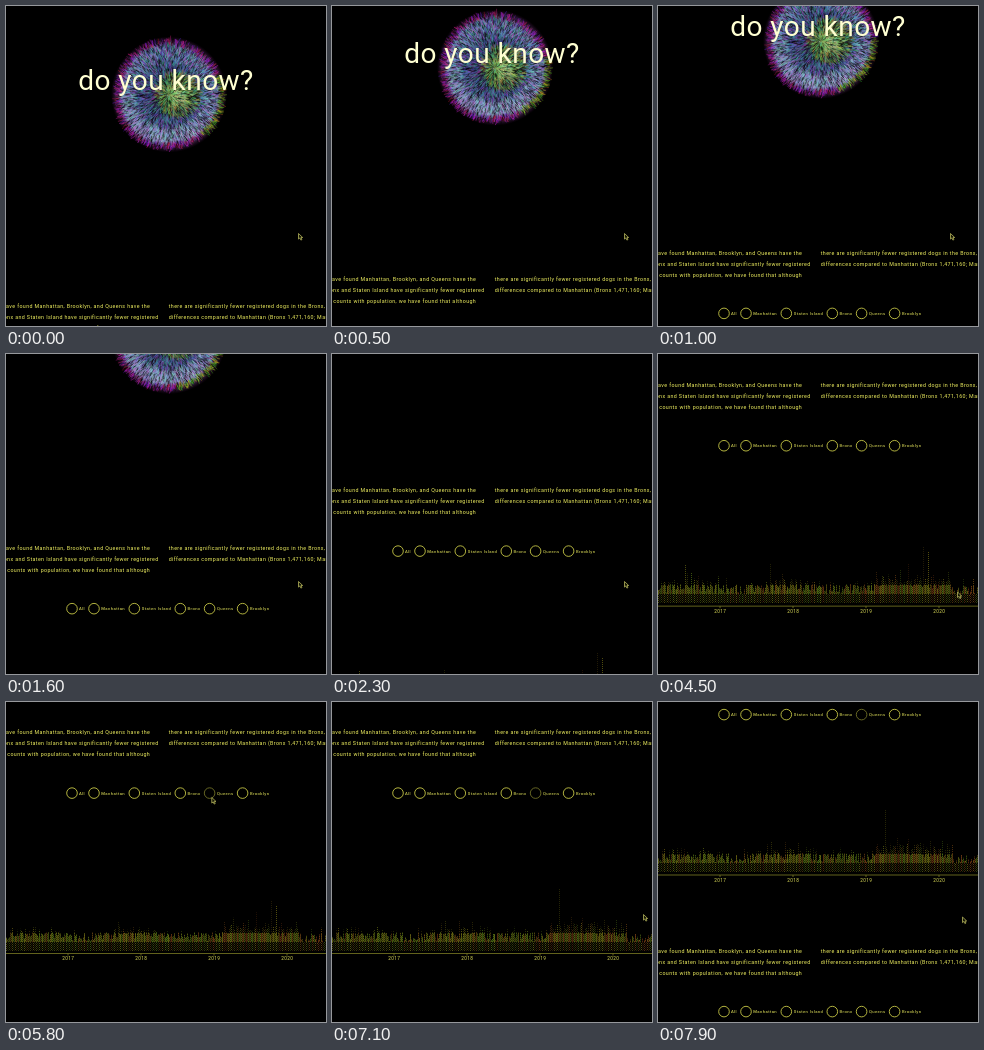
Write an HTML page with a canvas that moves like this. It is 320 px wide and 320 px high and loops after 8000 ms.

```html
<!DOCTYPE html>
<html lang="en">
<head>
<meta charset="utf-8">
<style>
  html, body { margin: 0; width: 100%; height: 100%; overflow: hidden; background: #000; }
  canvas, svg { position: absolute; left: 0; top: 0; width: 100%; height: 100%; }
  text { font-family: Roboto, Arial, sans-serif; fill: #f0f060; }
  .title { font-size: 28px; letter-spacing: .47px; fill: #ffffd2; }
  .body { font-size: 5.3px; letter-spacing: .395px; }
  .label { font-size: 4.2px; letter-spacing: .4px; }
  .year { font-size: 4.7px; letter-spacing: .35px; fill: #dcdc58; text-anchor: middle; }
  .end { text-anchor: end; }
  circle { fill: none; stroke: #d0d04a; stroke-width: .85; }
  .axis { fill: none; stroke: #7c7c24; stroke-width: .8; }
  #cursor { fill: #181806; stroke: #b4b45c; stroke-width: .8; }
</style>
</head>
<body>
<canvas id="stage" width="320" height="320"></canvas>
<svg viewBox="0 0 320 320">
  <g id="page"></g>
  <path id="cursor" d="M0 0V5.6L1.4 4.4L2.4 6.6L3.4 6.1L2.5 4H4.2Z"/>
</svg>
<script>
const LOOP = 8000, STEP = 100, BASE = 521.5, SECTION = 297;
const byId = id => document.getElementById(id);
const page = byId('page'), cursor = byId('cursor');
const ctx = byId('stage').getContext('2d');

let seed = 7;
const rand = () => (seed = seed * 16807 % 2147483647) / 2147483647;
const clamp = v => Math.max(0, Math.min(1, v));
const ease = v => v * v * (3 - 2 * v);

function add(tag, attrs, text = '') {
  const node = document.createElementNS('http://www.w3.org/2000/svg', tag);
  for (const key in attrs) node.setAttribute(key, attrs[key]);
  node.textContent = text;
  page.append(node);
  return node;
}
const write = (text, x, y, style) => add('text', { x, y, class: style }, text);

// Page content
write('do you know?', 72.2, 83.7, 'title');

const leftColumn = [
  ['have found Manhattan, Brooklyn, and Queens have the', 144.2],
  ['Bronx and Staten Island have significantly fewer registered', 152.6],
  ['counts with population, we have found that although', 144.2]
];
const rightColumn = [
  'there are significantly fewer registered dogs in the Bronx,',
  'differences compared to Manhattan (Bronx 1,471,160; Manhattan'
];
const boroughs = [
  ['All', 66, 73], ['Manhattan', 88, 95.3], ['Staten Island', 128.3, 135.8],
  ['Bronx', 174.3, 181.6], ['Queens', 203.6, 211], ['Brooklyn', 236.6, 244]
];

function addSection(dy) {
  leftColumn.forEach(([line, x], i) => write(line, x, 302.3 + dy + i * 11, 'body end'));
  rightColumn.forEach((line, i) => write(line, 162.7, 302.3 + dy + i * 11, 'body'));
  return boroughs.map(([name, cx, x]) => {
    write(name, x, 362.7 + dy, 'label');
    return add('circle', { cx, cy: 361.1 + dy, r: 5.3 });
  });
}
const queens = addSection(0)[4];
addSection(SECTION);

add('path', { class: 'axis', d: `M0 ${BASE}H320` + [62, 135, 208, 281].map(x => `M${x} ${BASE}v2`).join('') });
[2017, 2018, 2019, 2020].forEach((year, i) => write(year, 62.2 + i * 73, BASE + 6.9, 'year'));

// Hairy ball
const BALL = 163, RADIUS = 58;
const hairs = Array.from({ length: 6500 }, () => ({
  a: rand() * Math.PI * 2, q: Math.sqrt(rand()), tilt: (rand() - .5) * .8,
  len: 2 + rand() * 4, tone: rand(), mix: rand() - .5
}));

function glow(x, y, r, ...colors) {
  const fill = ctx.createRadialGradient(x, y, 0, x, y, r);
  colors.forEach((color, i) => fill.addColorStop(i / (colors.length - 1), color));
  ctx.fillStyle = fill;
  ctx.fillRect(x - r, y - r, 2 * r, 2 * r);
}

function hairColor({ a, q, tone, mix }, x, y, turn) {
  if (tone < .36) return '#000';
  const core = Math.hypot(x - 9, y);
  const right = Math.cos(a - .25 - turn);
  let hue = 225, sat = 50, light = 42, spread = 170;
  if (core < 21) [hue, light] = [95, 66 - core];
  else if (q > .9) [hue, sat, light, spread] = [right > .8 ? 80 : 305, 75, 42, 110];
  else if (q > .62) light = 58 + 9 * Math.sin(a);
  return `hsl(${hue + mix * spread} ${sat}% ${light + (tone - .68) * 34}%)`;
}

function drawBall(y, turn) {
  glow(BALL, y, RADIUS, '#3c4a50', '#364054', '#303a5c', '#4c5c88', '#7484ac', '#8070a0', '#50105000');
  glow(BALL + 9, y, 23, '#b8e898', '#88b850c0', '#48702870', '#20301000');
  glow(BALL - 13, y - 1, 7, '#c050a0', '#80306000');
  ctx.lineWidth = .6;
  ctx.globalAlpha = .72;
  for (const hair of hairs) {
    const { a, q, tilt, len } = hair;
    const r = 52.5 * q * (1 + .02 * Math.sin(3 * a + 1));
    const dx = r * Math.cos(a), dy = r * Math.sin(a);
    ctx.strokeStyle = hairColor(hair, dx, dy, turn);
    ctx.beginPath();
    ctx.moveTo(BALL + dx, y + dy);
    ctx.lineTo(BALL + dx + len * Math.cos(a + tilt), y + dy + len * Math.sin(a + tilt));
    ctx.stroke();
  }
  ctx.globalAlpha = 1;
}

// Bar chart
function makeHeights(spikes) {
  const bars = Array.from({ length: 320 }, (_, x) => {
    const wave = 19 + 2 * Math.sin(x / 17) + (x > 215 && x < 295 ? 5 : 0) - (x > 295 ? 3 : 0);
    return wave + (rand() - .5) * 12 + (rand() > .93 ? 7 : 0);
  });
  for (const [x, h] of spikes) bars[x] = h;
  return bars;
}
const allDogs = makeHeights([[27, 41], [33, 34], [112, 43], [125, 27], [242, 36], [250, 43], [265, 59], [270, 54], [290, 34]]);
const filtered = makeHeights([[45, 28], [86, 27], [113, 34], [227, 66], [250, 37], [262, 32], [284, 34]]);
const barColors = allDogs.map((_, x) => {
  const warm = rand() < (x > 200 ? .5 : .15);
  return `hsl(${warm ? 20 + rand() * 28 : 50 + rand() * 35} 70% ${17 + rand() * 10}%)`;
});

function drawBar(x, bottom, top, alpha) {
  ctx.globalAlpha = alpha;
  ctx.beginPath();
  ctx.moveTo(x + .5, bottom);
  ctx.lineTo(x + .5, top);
  ctx.stroke();
}

function drawChart(y, t) {
  ctx.lineWidth = 1;
  ctx.setLineDash([1, 1]);
  for (let x = 0; x < 320; x++) {
    const k = ease(clamp((t - 5100 - x * 1.5) / 1100));
    const h = allDogs[x] + (filtered[x] - allDogs[x]) * k;
    ctx.strokeStyle = barColors[x];
    ctx.lineDashOffset = x % 2;
    drawBar(x, y - 3, y - h, x % 3 ? .4 : .75);
    drawBar(x, y - 12, y - Math.min(h, 21), .9);
  }
  ctx.globalAlpha = 1;
  ctx.setLineDash([]);
}

// Motion: [time, value, ...]
const scrollKeys = [
  [0, 0], [1000, 53.7], [1800, 124], [2300, 164], [2800, 190], [3400, 212], [3500, 212],
  [3600, 218], [4400, 269.2], [4900, 270], [7100, 270], [7900, 348.5]
];
const cursorKeys = [
  [0, 292.5, 227.5], [4200, 292.5, 227.5], [4500, 299.5, 238], [4950, 204, 91],
  [5900, 206, 96], [6700, 311.5, 212.5], [7100, 311.5, 212.5], [7800, 304.5, 215]
];

function at(keys, t) {
  const i = keys.findIndex(key => key[0] > t);
  if (i < 0) return keys[keys.length - 1].slice(1);
  const from = keys[i - 1], to = keys[i];
  const k = (t - from[0]) / (to[0] - from[0]);
  return from.slice(1).map((v, j) => v + (to[j + 1] - v) * k);
}

function draw(t) {
  const [scroll] = at(scrollKeys, t);
  page.setAttribute('transform', `translate(0 ${-scroll})`);
  cursor.setAttribute('transform', `translate(${at(cursorKeys, t)})`);
  queens.style.stroke = t >= 5100 ? '#77772a' : '';
  ctx.clearRect(0, 0, 320, 320);
  if (scroll < 150) drawBall(88.5 - scroll, t / 3000);
  if (scroll > 130) drawChart(Math.round(BASE - scroll), t);
}

const start = performance.now();
let shown = -1;
function tick() {
  const t = Math.floor((performance.now() - start) % LOOP / STEP) * STEP;
  if (t !== shown) draw(shown = t);
  requestAnimationFrame(tick);
}
tick();
</script>
</body>
</html>
```
